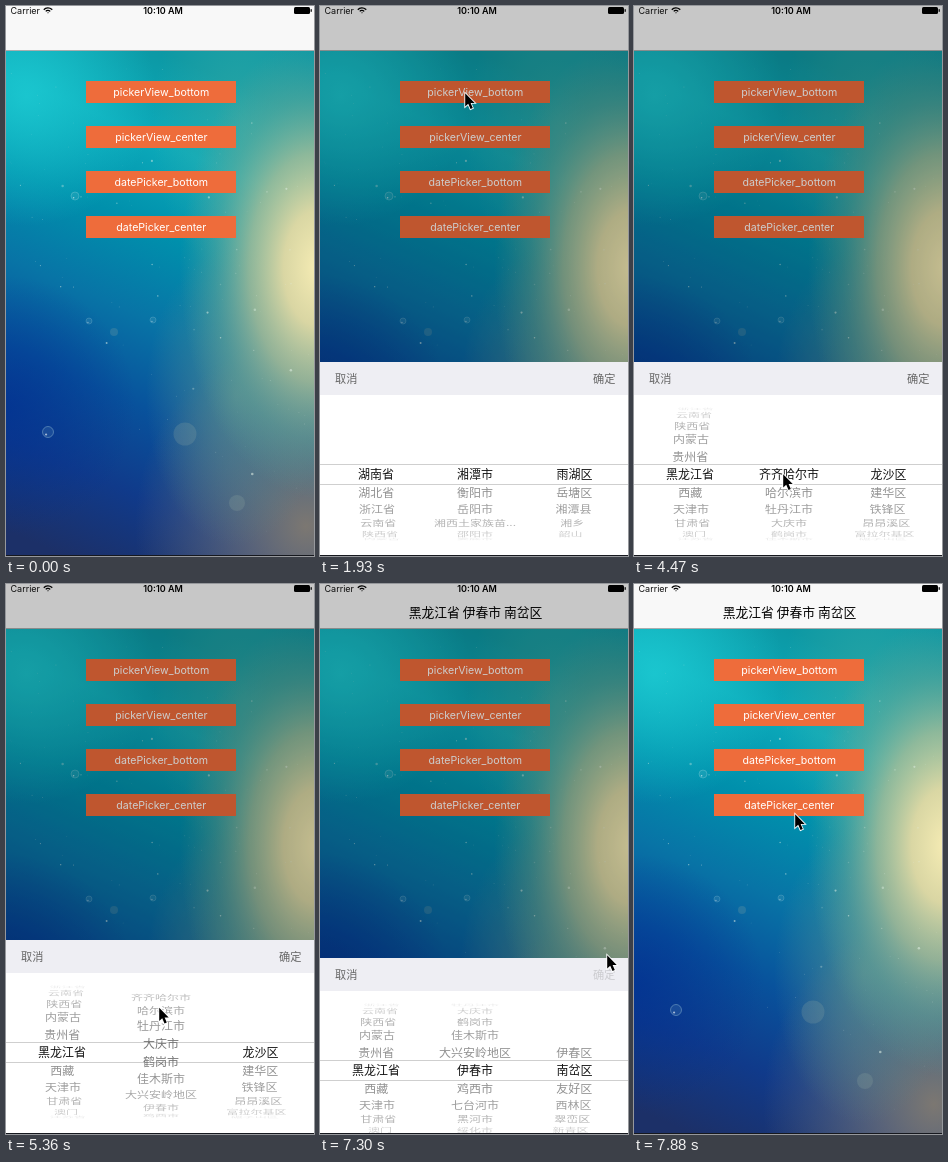
Write an HTML page with a canvas that moves like this. It is 308 px wide and 550 px high and loops after 8 s.

```html
<!DOCTYPE html>
<html lang="zh">
<head>
<meta charset="utf-8">
<style>
html, body { margin: 0; height: 100%; overflow: hidden; background: #fff; }
canvas { display: block; width: 308px; height: 550px; }
</style>
</head>
<body>
<canvas id="stage" width="308" height="550"></canvas>
<script>
const W = 308, H = 550, LOOP = 8000, STEP = 149;
const ctx = document.getElementById('stage').getContext('2d');
const LATIN = 'Inter, "Liberation Sans", sans-serif';
const CJK = '"Noto Sans CJK SC", "Noto Sans CJK", sans-serif';
const ROW_ANGLE = .278, WHEEL_RADIUS = 66;

// Cursor moves: start and end (in steps of about 149 ms), then the goal.
const moves = [
  [1, 4, 186, 150], [5, 9, 144, 86],
  [13, 18, 36, 530], [18, 21, 50, 519],
  [23, 27, 47, 386], [28, 30, 148, 467], [30, 32, 150, 486],
  [34, 38, 154, 359], [38, 39, 250, 480], [39, 40, 252, 462],
  [40, 41, 299, 371], [41, 46, 286, 370], [49, 53, 160, 229]
];

const words = s => s.split(' ');
const provinces = words('湖南省 湖北省 浙江省 云南省 陕西省 内蒙古 贵州省 黑龙江省 西藏 天津市 甘肃省 澳门 江苏省');
const hunan = words('湘潭市 衡阳市 岳阳市 湘西土家族苗... 邵阳市 娄底市');
const xiangtan = words('雨湖区 岳塘区 湘潭县 湘乡 韶山');
const heilongjiang = words('齐齐哈尔市 哈尔滨市 牡丹江市 大庆市 鹤岗市 佳木斯市 大兴安岭地区 伊春市 鸡西市 七台河市 黑河市 绥化市 双鸭山市');
const qiqihar = words('龙沙区 建华区 铁锋区 昂昂溪区 富拉尔基区 碾子山区');
const yichun = words('伊春区 南岔区 友好区 西林区 翠峦区 新青区 美溪区');

// Eased progress from 0 to 1 between steps a and b.
function ramp(k, a, b) {
  const p = Math.min(1, Math.max(0, (k - a) / (b - a)));
  return p * p * (3 - 2 * p);
}

function text(str, x, y, size, color, { font = CJK, weight = 400, align = 'center' } = {}) {
  ctx.font = `${weight} ${size}px ${font}`;
  ctx.textAlign = align;
  ctx.fillStyle = color;
  ctx.fillText(str, x, y + size * .37);
}

function rect(x, y, w, h, color) {
  ctx.fillStyle = color;
  ctx.fillRect(x, y, w, h);
}

function makeWallpaper() {
  const canvas = document.createElement('canvas');
  canvas.width = W;
  canvas.height = H;
  const c = canvas.getContext('2d');
  const blend = (gradient, colors) => {
    colors.forEach((color, i) => gradient.addColorStop(i / (colors.length - 1), color));
    return gradient;
  };
  const glow = (x, y, r, sx, colors) => {
    c.save();
    c.translate(x, y);
    c.scale(sx, 1);
    c.fillStyle = blend(c.createRadialGradient(0, 0, 0, 0, 0, r), colors);
    c.fillRect(-r, -r, 2 * r, 2 * r);
    c.restore();
  };
  const spot = (x, y, r, sx, rgb, a) => glow(x, y, r, sx, [`rgba(${rgb},${a})`, `rgba(${rgb},0)`]);

  c.fillStyle = blend(c.createLinearGradient(190, 60, -10, 520),
    ['#0c98a4', '#0caaba', '#0090ac', '#0874a6', '#08529c', '#103a8a', '#1c3068']);
  c.fillRect(0, 0, W, H);
  spot(20, 90, 130, 1, '30,205,212', .8);
  spot(0, 400, 130, 1, '0,48,146', .7);
  spot(235, 120, 150, .6, '70,178,165', .5);
  spot(300, 520, 190, .9, '130,122,112', .95);
  spot(230, 390, 150, .6, '95,145,142', .7);
  glow(312, 262, 230, .6, [
    '#f6ecb4', 'rgba(226,217,163,.96)', 'rgba(172,190,150,.8)',
    'rgba(110,170,150,.45)', 'rgba(90,160,150,0)'
  ]);

  const dot = (x, y, r, color) => {
    c.fillStyle = color;
    c.beginPath();
    c.arc(x, y, r, 0, 7);
    c.fill();
  };
  let seed = 11;
  const rnd = () => (seed = seed * 16807 % 2147483647) / 2147483647;
  for (let i = 0; i < 130; i++) {
    const x = rnd() * W;
    const y = 90 + x * .9 + (rnd() + rnd() - 1) * 230;
    dot(x, y, .3 + rnd() ** 6, `rgba(225,240,230,${.2 + rnd() * .45})`);
  }
  [[69, 190, 4], [83, 315, 3], [147, 314, 3], [42, 426, 5.5]].forEach(([x, y, r]) => {
    dot(x, y, r, 'rgba(160,210,225,.12)');
    c.strokeStyle = `rgba(190,225,230,${r * .08})`;
    c.lineWidth = .8;
    c.stroke();
    dot(x - r * .35, y + r * .45, r * .2, 'rgba(255,255,255,.6)');
  });
  [[108, 326, 4], [179, 428, 11.5], [231, 497, 8]]
    .forEach(([x, y, r]) => dot(x, y, r, 'rgba(150,175,165,.22)'));
  return canvas;
}
const wallpaper = makeWallpaper();

function drawNavBar(k) {
  rect(0, 0, W, 45, '#f8f8f8');
  rect(0, 44, W, 1, '#a9adae');
  text('Carrier', 4.5, 4.6, 9, '#111', { font: LATIN, align: 'left' });
  text('10:10 AM', 157, 4.6, 9, '#000', { font: LATIN, weight: 600 });
  ctx.strokeStyle = '#000';
  ctx.lineWidth = 1.3;
  [0, 2.6, 5.2].forEach(r => {
    ctx.beginPath();
    ctx.arc(42, 7.4, r + .4, -Math.PI * .77, -Math.PI * .23);
    ctx.stroke();
  });
  ctx.fillStyle = '#000';
  ctx.beginPath();
  ctx.roundRect(288, 1, 16, 7, 1.5);
  ctx.fill();
  rect(304.6, 3.2, 1.2, 2.6, '#000');
  if (k >= 49) text('黑龙江省 伊春市 南岔区', 155.5, 28.3, 12.8, '#000', { weight: 500 });
}

function drawButtons(k) {
  ['pickerView_bottom', 'pickerView_center', 'datePicker_bottom', 'datePicker_center'].forEach((label, i) => {
    const y = 75.4 + i * 44.9;
    rect(80, Math.round(y), 150, 22, '#ee6c3b');
    const pressed = i === 0 && k === 11;
    text(label, 155.3, y + 10.7, 10.6, pressed ? 'rgba(255,255,255,.25)' : '#fff', { font: LATIN });
  });
}

function drawWheel(rows, pos, x, lean) {
  rows.forEach((row, i) => {
    const d = i - pos;
    if (Math.abs(d) > 5.3) return;
    const tilt = Math.max(.1, Math.cos(d * ROW_ANGLE));
    const shade = 140 - 120 * Math.max(0, 1 - Math.abs(d) * 1.6);
    ctx.save();
    ctx.globalAlpha = tilt;
    ctx.translate(x + lean * 7 * (1 - tilt), 468.5 + WHEEL_RADIUS * Math.sin(d * ROW_ANGLE));
    ctx.scale(1, tilt);
    text(row, 0, 0, 12, `rgb(${shade},${shade},${shade})`);
    ctx.restore();
  });
}

function drawPanel(k, hidden) {
  ctx.save();
  ctx.translate(0, Math.round(194 * hidden));
  rect(0, 389, W, 161, '#fff');
  rect(0, 356, W, 33, '#eeeef3');
  text('取消', 15, 372.5, 11.2, '#666', { align: 'left' });
  text('确定', 295.5, 372.5, 11.2, k >= 49 ? 'rgba(102,102,102,.25)' : '#666', { align: 'right' });
  [458, 478].forEach(y => rect(0, y, W, 1, '#cfcfcf'));
  drawWheel(provinces, 7 * ramp(k, 23, 27), 56, 1);
  drawWheel(k < 28 ? hunan : heilongjiang, 7 * ramp(k, 34, 38), 155, 0);
  drawWheel(k < 28 ? xiangtan : k < 38 ? qiqihar : yichun, ramp(k, 39, 40), 254.5, -1);
  ctx.restore();
}

function drawCursor(k) {
  if (k < 1) return;
  let x = 293, y = 318;
  for (const [from, to, goalX, goalY] of moves) {
    const p = ramp(k, from, to);
    x += (goalX - x) * p;
    y += (goalY - y) * p;
  }
  ctx.save();
  ctx.translate(x + 1.2, y + 1.3);
  ctx.scale(.95, .95);
  const arrow = new Path2D('M0 0V14L3.2 11.1 5.6 16.6 8 15.6 5.7 10.2H10Z');
  ctx.strokeStyle = '#fff';
  ctx.lineWidth = 1.8;
  ctx.stroke(arrow);
  ctx.fillStyle = '#000';
  ctx.fill(arrow);
  ctx.restore();
}

function draw(now) {
  const k = Math.floor((now % LOOP + 20) / STEP);
  const hidden = 1 - ramp(k, 11, 13) + ramp(k, 48.62, 50.62);
  ctx.drawImage(wallpaper, 0, 0);
  drawNavBar(k);
  drawButtons(k);
  rect(0, 0, W, H, `rgba(0,0,0,${.2 * Math.min(1, 1.1 * (1 - hidden))})`);
  drawPanel(k, hidden);
  rect(0, 549, W, 1, '#16181e');
  drawCursor(k);
}

const start = performance.now();
function tick() {
  draw(performance.now() - start);
  requestAnimationFrame(tick);
}
tick();
</script>
</body>
</html>
```
